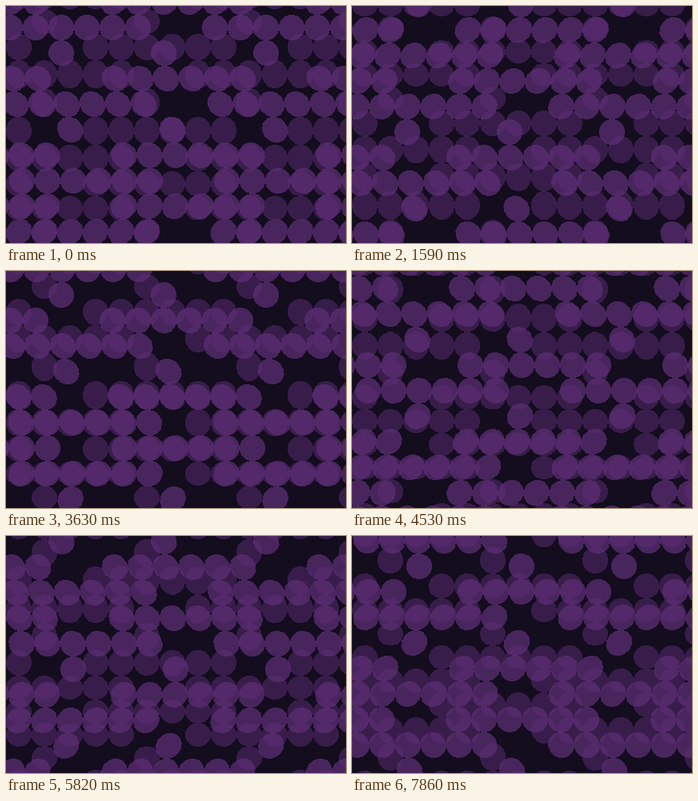
An HTML page with a canvas for the animation above (7.89 s loop, 425 by 297 pixels).

```html
<!DOCTYPE html>
<html lang="en">
<head>
<meta charset="utf-8">
<title>Rolling dots</title>
<style>
  html, body { margin: 0; width: 100%; height: 100%; overflow: hidden; background: #130d1e; }
  canvas { display: block; width: 100%; height: 100%; image-rendering: pixelated; }
</style>
</head>
<body>
<canvas id="stage" width="425" height="297"></canvas>
<script>
const W = 425, H = 297, LOOP = 7890, STEP = 30;
const TILE = 256, CELL = 32, R = 16;
const WAVE_LENGTH = 364, WAVE_PERIOD = 1200;

const LONG = '11111100', PAIR = '00100010', SPLIT = '11001111';
const ROWS = [LONG, PAIR, SPLIT, LONG, PAIR, SPLIT, LONG, SPLIT];

const ctx = document.getElementById('stage').getContext('2d');
const mod = (n, m) => ((n % m) + m) % m;

// Hard-edged dots, repeated three times across so any shift can be cut out.
function makeTile(color) {
  const tile = document.createElement('canvas');
  tile.width = TILE * 3;
  tile.height = TILE;
  const g = tile.getContext('2d');
  g.fillStyle = color;
  ROWS.forEach((row, j) => {
    for (let i = 0; i < 24; i++) {
      if (row[i % 8] === '0') continue;
      for (let k = 0; k < CELL; k++) {
        const dy = k + 0.5 - R;
        const half = Math.round(Math.sqrt(R * R - dy * dy));
        g.fillRect(i * CELL + R - half, j * CELL + k, half * 2, 1);
      }
    }
  });
  return tile;
}

const back = makeTile('#381d4a');
const front = makeTile('rgba(94, 47, 118, 0.74)');

function wave(y, t, crest, mean, amp) {
  const phase = (y - crest) / WAVE_LENGTH - t / WAVE_PERIOD;
  return Math.round(mean + amp * Math.cos(2 * Math.PI * phase));
}

function line(tile, sx, sy, y) {
  ctx.drawImage(tile, mod(sx, TILE), mod(sy, TILE), W, 1, 0, y, W, 1);
}

function draw(t) {
  ctx.fillStyle = '#130d1e';
  ctx.fillRect(0, 0, W, H);
  const scroll = Math.round(t / 16);
  for (let y = 0; y < H; y++) {
    line(back, 32, y + 32 - wave(y, t, 213, 9, 6), y);
    line(front, 16 - wave(y, t, 217, 12.5, 8), y - 11 - scroll, y);
  }
}

ctx.imageSmoothingEnabled = false;
const start = performance.now();
function tick(now) {
  const t = Math.max(0, now - start) % LOOP;
  draw(Math.floor(t / STEP) * STEP);
  requestAnimationFrame(tick);
}
draw(0);
requestAnimationFrame(tick);
</script>
</body>
</html>
```
